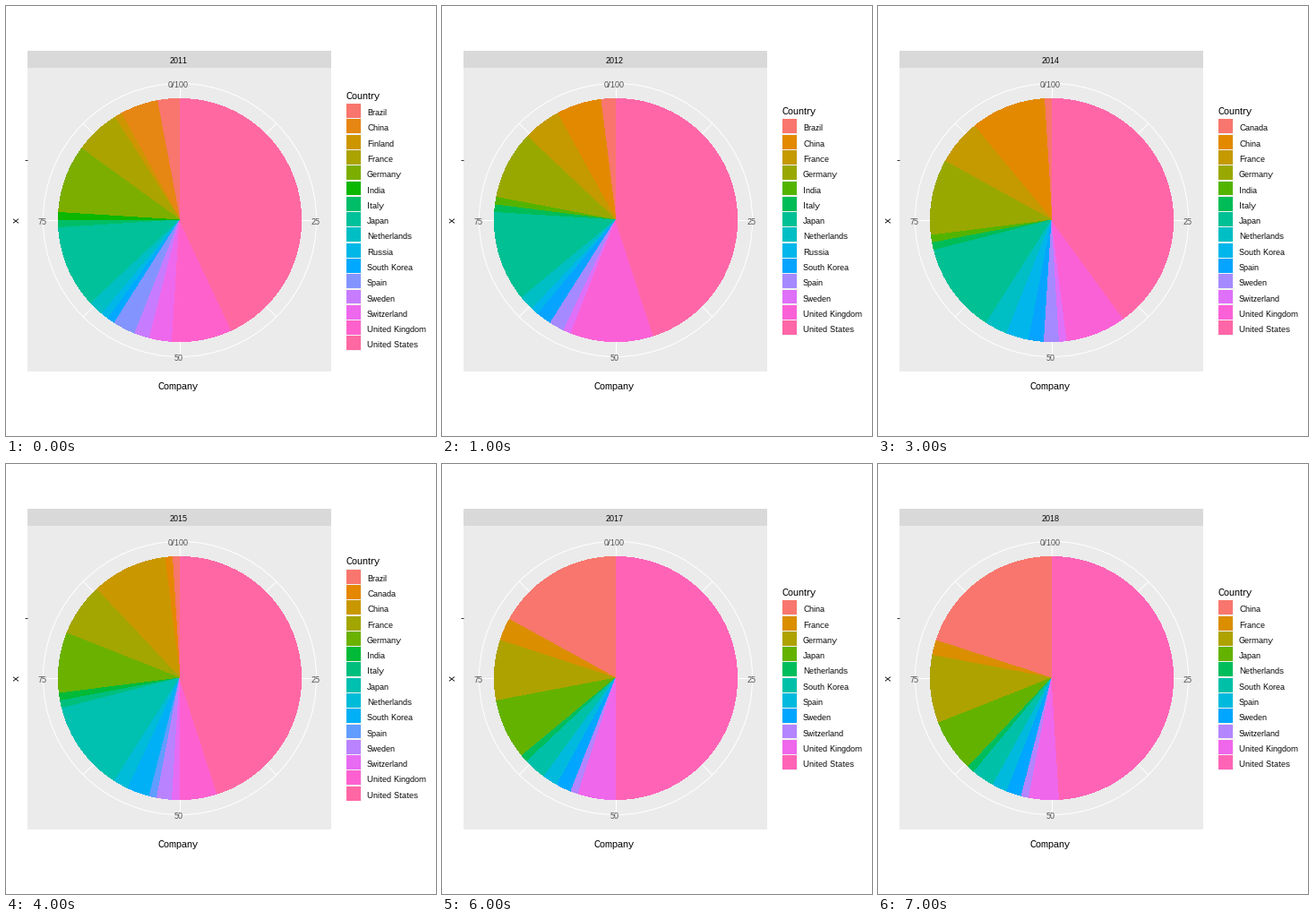
Animation of 480 by 480 pixels, one loop 8 s. Source, as a matplotlib script:

```python
import numpy as np
import matplotlib.pyplot as plt
from matplotlib.animation import ArtistAnimation
from matplotlib.patches import Circle, Rectangle, Wedge

SIZE, DPI = 480, 100
PX = 72 / DPI  # points per pixel
CX, CY, PANEL = 194, 239, 339
PIE_R, RING_R = 0.4 * PANEL, 0.45 * PANEL
KEY = 17.28
FIRST_YEAR, YEARS = 2011, 8

# turning points {years since the first: companies}, straight lines between
TRENDS = {
    "Brazil": {0: 3, 3: 0, 4: 1, 5: 0},
    "Canada": {1: 0, 2: 1, 4: 1, 5: 0},
    "China": {0: 5, 1: 6, 3: 10, 4: 10, 5: 14, 7: 20},
    "Finland": {0: 1, 1: 0},
    "France": {0: 6, 1: 5, 2: 5, 4: 7, 5: 4, 7: 2},
    "Germany": {2: 9, 3: 10, 4: 8, 5: 7, 7: 9},
    "India": {5: 1, 6: 0},
    "Italy": {4: 1, 5: 0},
    "Japan": {0: 11, 1: 12, 4: 12, 5: 10, 7: 7},
    "Netherlands": {2: 2, 3: 3, 5: 1},
    "Russia": {2: 1, 3: 0},
    "South Korea": {0: 1, 1: 2, 2: 2, 3: 3},
    "Spain": {0: 3, 1: 2, 3: 2, 4: 1, 5: 1, 6: 2},
    "Sweden": {0: 2, 1: 1, 2: 2},
    "Switzerland": {0: 3, 1: 0, 2: 1},
    "United Kingdom": {0: 8, 1: 11, 3: 8, 4: 5, 5: 6, 7: 4},
}

plt.rcParams.update({
    "font.family": "Liberation Sans",
    "text.hinting": "native",
    "text.hinting_factor": 1,
})
fig = plt.figure(figsize=(SIZE / DPI, SIZE / DPI), dpi=DPI, facecolor="white")
ax = fig.add_axes([0, 0, 1, 1])
ax.set(xlim=(0, SIZE), ylim=(SIZE, 0))
ax.axis("off")


def hcl(hue, chroma=100, light=65):
    """Polar LUV colour to clipped sRGB."""
    h = np.radians(hue)
    y = ((light + 16) / 116) ** 3
    u = chroma * np.cos(h) / (13 * light) + 0.1978398
    v = chroma * np.sin(h) / (13 * light) + 0.4683363
    x = 9 * y * u / (4 * v)
    z = -x / 3 - 5 * y + 3 * y / v
    rgb = np.array([
        3.240479 * x - 1.537150 * y - 0.498535 * z,
        -0.969256 * x + 1.875992 * y + 0.041556 * z,
        0.055648 * x - 0.204043 * y + 1.057311 * z,
    ]).clip(0, 1)
    gamma = np.where(rgb > 0.00304, 1.055 * rgb ** (1 / 2.4) - 0.055, 12.92 * rgb)
    return tuple(gamma.clip(0, 1))


def shares(year):
    """Companies per country; the United States hold the rest of the 100."""
    counts = {name: round(np.interp(year, list(t), list(t.values())))
              for name, t in TRENDS.items()}
    counts["United States"] = 100 - sum(counts.values())
    return [(name, n) for name, n in counts.items() if n]


def text(x, y, s, size=9, color="black", **kw):
    return ax.text(x, y, s, fontsize=size * PX, color=color, zorder=5, **kw)


def rect(x, y, w, h, color):
    return ax.add_patch(Rectangle((x, y), w, h, fc=color, lw=0, aa=False))


def line(xs, ys, color):
    ax.plot(xs, ys, color=color, lw=PX, zorder=2, solid_capstyle="butt")


def draw_backdrop():
    rect(24, 50, PANEL, 19, "#D9D9D9")
    rect(24, 69, PANEL, PANEL, "#EBEBEB")
    for a in np.radians(np.arange(0, 360, 45)):
        line([CX, CX + RING_R * np.sin(a)], [CY, CY - RING_R * np.cos(a)], "white")
    ax.add_patch(Circle((CX, CY), RING_R, fill=False, ec="white", lw=PX, zorder=2))
    line([21, 24], [171.5, 171.5], "#333333")
    for x, y, s in ((192.5, 91, "0/100"), (346, 244, "25"),
                    (193, 396, "50"), (41, 244, "75")):
        text(x, y, s, color="#4D4D4D", ha="center")
    text(192.5, 428, "Company", 11, ha="center")
    text(12, 239.5, "x", 11, rotation=90, ha="center", va="center")


def draw_year(year):
    rows = shares(year)
    n = len(rows)
    top = 247.1 - n * KEY / 2
    parts = [text(193, 64, str(FIRST_YEAR + year), ha="center"),
             text(380, round(top - 5), "Country", 11),
             rect(380, round(top), 17, round(n * KEY), "#F2F2F2")]
    end = 270
    for k, (name, count) in enumerate(rows):
        color = hcl(15 + 360 * k / n)
        start = end - 3.6 * count
        wedge = Wedge((CX, CY), PIE_R, start, end, fc=color, lw=0, aa=False, zorder=3)
        y = top + k * KEY
        y0, y1 = round(y + 0.3), round(y + 16.2)
        parts += [ax.add_patch(wedge),
                  rect(380, y0, 16, y1 - y0, color),
                  text(403, round(y + 13.3), name)]
        end = start
    return parts


draw_backdrop()
frames = [draw_year(year) for year in range(YEARS)]
anim = ArtistAnimation(fig, frames, interval=1000, repeat=True, repeat_delay=0)
plt.show()
```
